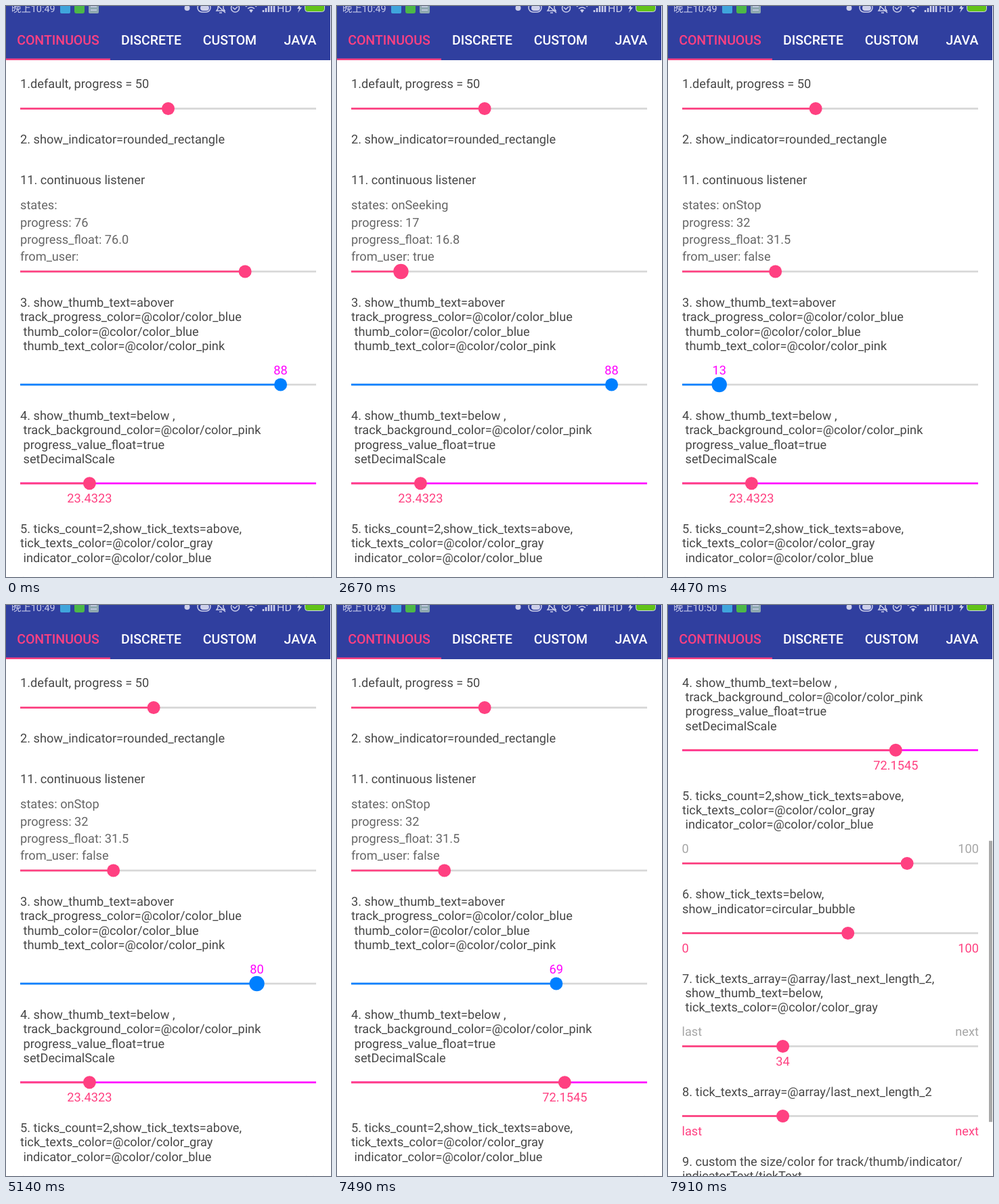
Animation, 480 px wide and 843 px high, one loop 8000 ms. Source, as an HTML page:

```html
<!DOCTYPE html>
<html lang="en">
<head>
<meta charset="utf-8">
<title>Seek bars</title>
<style>
html, body { margin: 0; width: 100%; height: 100%; overflow: hidden; background: #fff; }
svg { display: block; width: 100vw; height: 100vh; }
text { font: 18.2px Roboto, sans-serif; white-space: pre; fill: #474747; text-rendering: geometricPrecision; }
.state { fill: #666; }
.pink { fill: #ff4081; }
.gray { fill: #a6a6a6; }
.magenta { fill: #f0f; }
.mid { text-anchor: middle; }
.end { text-anchor: end; }
.tab { font-size: 19.5px; font-weight: 500; text-anchor: middle; fill: #fff; }
.tab.on { fill: #ff4081; }
#status text { font: 14.4px Roboto, "Noto Sans CJK SC", "Noto Sans CJK", sans-serif; fill: #cdd0ea; }
#status .hd { font-size: 16px; }
.line { fill: none; stroke: #cdd0ea; stroke-width: 1.5; }
</style>
</head>
<body>
<svg viewBox="0 0 480 843">
  <g id="page"></g>
  <rect id="bar" x="474" width="5" height="415" fill="#a9a9a9"/>
  <rect width="479" height="80" fill="#303f9f"/>
  <rect y="77.500" width="154" height="2.500" fill="#ff4081"/>
  <text class="tab on" x="77" y="56.5">CONTINUOUS</text>
  <text class="tab" x="214.5" y="56.5">DISCRETE</text>
  <text class="tab" x="330.5" y="56.5">CUSTOM</text>
  <text class="tab" x="434.5" y="56.5">JAVA</text>
  <g id="status">
    <text id="clock" x="8" y="9"></text>
    <rect x="80" y="-4" width="15" height="15" rx="2" fill="#3fa5dc"/>
    <rect x="101" y="-4" width="15" height="15" rx="3" fill="#4db848"/>
    <rect x="122" y="-4" width="15" height="15" rx="2" fill="#8fa9b0"/>
    <path d="M125 1h9M125 6h9" class="line"/>
    <circle cx="267.5" cy="3" r="4" fill="#cdd0ea"/>
    <rect x="283" y="-4" width="19" height="13" rx="6.5" class="line"/>
    <rect x="287" y="-1" width="13" height="8" rx="4" fill="#cdd0ea"/>
    <path class="line" d="M311 7h12l-2-3v-7h-8v7zM315 10h4M310-3l14 13"/>
    <circle class="line" cx="338.5" cy="3" r="6"/>
    <path class="line" d="M335 2l3 3l4-4"/>
    <path class="line" d="M354 1q8-7 16 0M357 4q5-4 10 0"/>
    <path d="M359 6q3-2 6 0l-3 4z" fill="#cdd0ea"/>
    <path d="M380 9v-3M384 9v-6M388 9v-9M392 9v-12M396 9v-15" stroke="#cdd0ea" stroke-width="2.5"/>
    <text class="hd" x="400" y="9">HD</text>
    <path d="M435-4l-5 8h3l-2 6l6-8h-3z" fill="#cdd0ea"/>
    <rect x="441.5" y="-5" width="29" height="13.5" rx="4" fill="#62c319" stroke="#cdd0ea"/>
  </g>
</svg>
<script>
const LOOP = 8000, STEP = 94, LEFT = 21, WIDTH = 437;
const PINK = '#ff4081', BLUE = '#007fff';
const SCROLL = { start: 7490, step: 84, steps: 5, distance: 490.5 };
const page = document.getElementById('page');
const bar = document.getElementById('bar');
const clock = document.getElementById('clock');

function add(tag, attrs) {
  const el = document.createElementNS('http://www.w3.org/2000/svg', tag);
  for (const name in attrs) el.setAttribute(name, attrs[name]);
  return page.appendChild(el);
}

function label(x, y, str, cls = '') {
  const el = add('text', { x, y, class: cls });
  el.textContent = str;
  return el;
}

const paragraph = (y, ...lines) => lines.forEach((s, i) => label(LEFT, y + i * 21.35, s));

function ticks(y, first, last, cls) {
  label(LEFT - 0.5, y, first, cls);
  label(LEFT + WIDTH + 1, y, last, cls + ' end');
}

// Builds one seek bar and returns a function that places its thumb.
function seekBar(y, { color = PINK, back = '#d7d7d7', textY, textClass = 'pink' } = {}) {
  const track = { y: y - 1.35, x: LEFT, height: 2.7 };
  add('rect', { ...track, width: WIDTH, fill: back });
  const done = add('rect', { ...track, fill: color });
  const thumb = add('circle', { cy: y, fill: color });
  const text = textY && label(0, textY, '', textClass + ' mid');
  return (value, pressed, str) => {
    const width = WIDTH * value / 100;
    done.setAttribute('width', width);
    thumb.setAttribute('cx', LEFT + width);
    thumb.setAttribute('r', pressed ? 11.2 : 9.5);
    if (text) {
      text.setAttribute('x', LEFT + width);
      text.textContent = str;
    }
  };
}

paragraph(121.4, '1.default, progress = 50');
const basic = seekBar(151.5);
paragraph(203.2, '2. show_indicator=rounded_rectangle');
paragraph(262.8, '11. continuous listener');
const states = [0, 1, 2, 3].map(i => label(LEFT, 300.4 + i * 25.1, '', 'state'));
const listener = seekBar(392);
paragraph(444, '3. show_thumb_text=abover', 'track_progress_color=@color/color_blue',
  ' thumb_color=@color/color_blue', ' thumb_text_color=@color/color_pink');
const above = seekBar(559, { color: BLUE, textY: 543.9, textClass: 'magenta' });
paragraph(611, '4. show_thumb_text=below ,', ' track_background_color=@color/color_pink',
  ' progress_value_float=true', ' setDecimalScale');
const below = seekBar(704.8, { back: '#f0f', textY: 733 });
paragraph(778, '5. ticks_count=2,show_tick_texts=above,', 'tick_texts_color=@color/color_gray',
  ' indicator_color=@color/color_blue');
ticks(856.3, '0', '100', 'gray');
seekBar(872)(76);
paragraph(923.9, '6. show_tick_texts=below,', 'show_indicator=circular_bubble');
seekBar(975)(56);
ticks(1003, '0', '100', 'pink');
paragraph(1048, '7. tick_texts_array=@array/last_next_length_2,', ' show_thumb_text=below,',
  ' tick_texts_color=@color/color_gray');
ticks(1126.6, 'last', 'next', 'gray');
seekBar(1142, { textY: 1170 })(34, false, '34');
paragraph(1215.2, '8. tick_texts_array=@array/last_next_length_2');
seekBar(1245)(34);
ticks(1273.2, 'last', 'next', 'pink');
paragraph(1318.6, '9. custom the size/color for track/thumb/indicator/', 'indicatorText/tickText');

const ease = u => u * u * (3 - 2 * u);

// Eases between the turning points [step, value] of a hand movement.
function swing(points, n) {
  const i = points.findIndex(p => p[0] > n);
  if (i < 0) return points[points.length - 1][1];
  const [n0, v0] = points[i - 1], [n1, v1] = points[i];
  return v0 + (v1 - v0) * ease((n - n0) / (n1 - n0));
}

// A thumb rests, is pressed, moves in steps and is let go.
function drag({ press, move, release, rest, points, end }) {
  return t => {
    const pressed = t >= press && t < release;
    if (t < press) return { value: rest, pressed };
    if (t >= release) return { value: end, pressed };
    const n = Math.max(0, 1 + Math.floor((t - move + 8) / STEP));
    return { value: Math.min(100, swing(points, n)), pressed };
  };
}

const basicDrag = drag({
  press: 420, move: 670, release: 2080, rest: 50, end: 45.1,
  points: [[0, 49.3], [4.3, 101], [11, 3.7], [13.5, 45.1]]
});
const listenerDrag = drag({
  press: 2220, move: 2380, release: 3940, rest: 76, end: 31.5,
  points: [[0, 74.5], [5, 10.1], [9, 81.7], [14, 29.8]]
});
const aboveDrag = drag({
  press: 3940, move: 4100, release: 5520, rest: 88, end: 69.3,
  points: [[0, 69], [6.5, 3.7], [14, 96.2], [16, 69.3]]
});
const belowDrag = drag({
  press: 5730, move: 5970, release: 7490, rest: 23.4323, end: 72.1545,
  points: [[0, 61.0837], [4, 91.5339], [6, 89.306], [10, 19.4508], [15, 72.1545]]
});

function listenerText(t, value) {
  const [state, user] = t < 2220 ? ['', ''] : t < 2380 ? ['onStart', 'true']
    : t < 3940 ? ['onSeeking', 'true'] : ['onStop', 'false'];
  const shown = t < 2380 ? 76 : value;
  return ['states: ' + state, 'progress: ' + Math.round(shown),
    'progress_float: ' + shown.toFixed(1), 'from_user: ' + user];
}

function draw(t) {
  const first = basicDrag(t), seek = listenerDrag(t), high = aboveDrag(t), low = belowDrag(t);
  basic(first.value, first.pressed);
  listener(seek.value, seek.pressed);
  listenerText(t, seek.value).forEach((s, i) => { states[i].textContent = s; });
  above(high.value, high.pressed, Math.round(high.value));
  below(low.value, low.pressed, +low.value.toFixed(4));

  const n = Math.floor((t - SCROLL.start) / SCROLL.step);
  const scroll = SCROLL.distance * ease(Math.min(1, Math.max(0, n / SCROLL.steps)));
  page.setAttribute('transform', `translate(0 ${-scroll})`);
  bar.setAttribute('y', 81 + scroll * 0.5447);
  bar.setAttribute('opacity', scroll > 0 ? 1 : 0);
  clock.textContent = scroll > 0 ? '晚上10:50' : '晚上10:49';
}

function frame() {
  draw(performance.now() % LOOP);
  requestAnimationFrame(frame);
}
frame();
</script>
</body>
</html>
```
